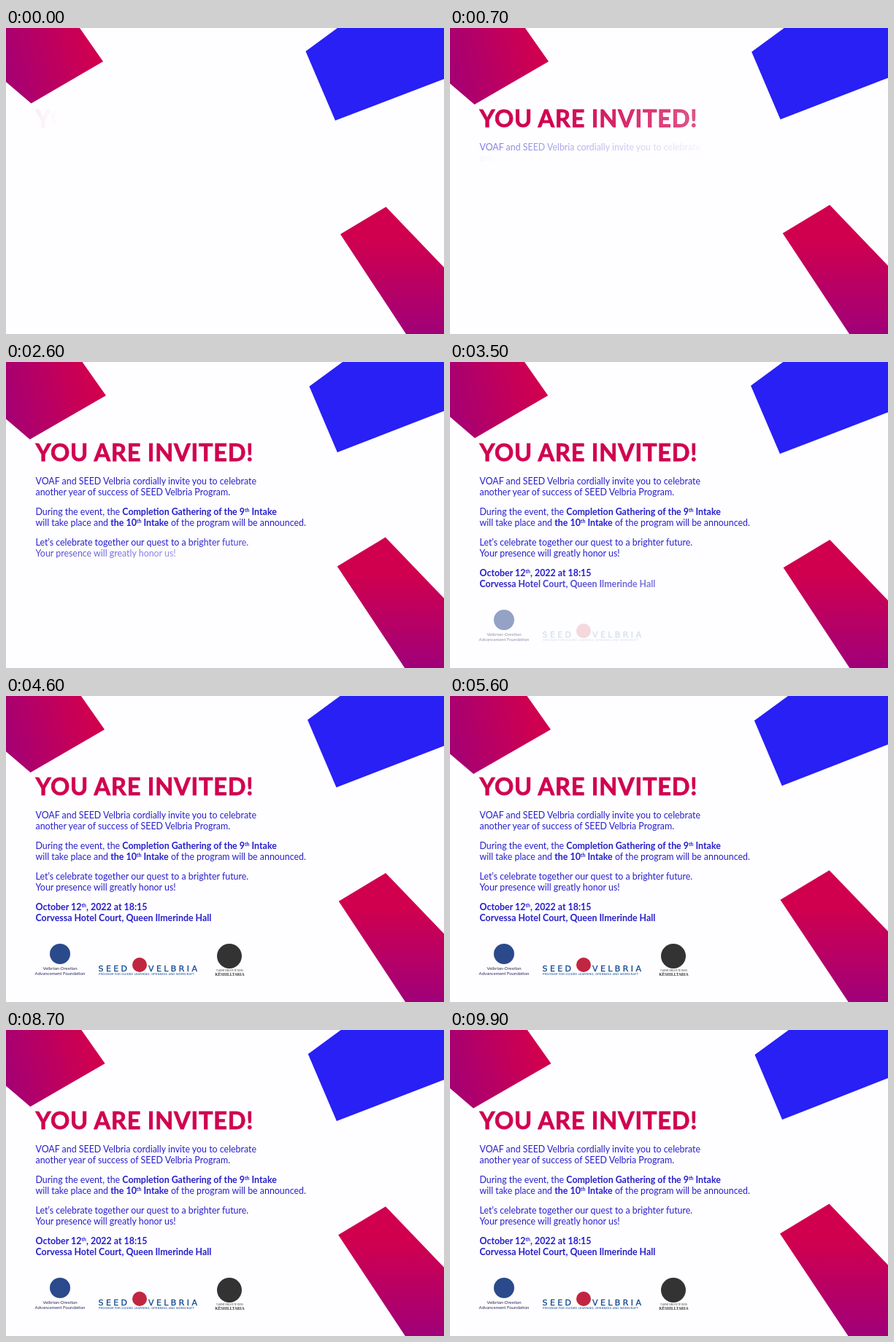
An HTML page for the animation above (10000 ms loop, 600 px wide and 420 px high).

```html
<!DOCTYPE html>
<html lang="en">
<head>
<meta charset="utf-8">
<title>Invitation</title>
<style>
  html, body { margin: 0; width: 100%; height: 100%; overflow: hidden; background: #fefdff; }
  svg { display: block; width: 600px; height: 420px; font-family: Lato, sans-serif; }
  .body { font-size: 12.4px; }
  .bold { font-weight: 700; }
  .sup { font-size: 7px; }
  .title { font-size: 32.5px; font-weight: 700; letter-spacing: .8px; stroke-width: .8px; }
  .small { font-size: 6.1px; text-anchor: middle; fill: #2b2a5c; }
  .wide { font: 11px "DejaVu Sans", sans-serif; letter-spacing: 3.4px; stroke: #124a8f; stroke-width: .3px; }
  .tag { font: 3.9px "DejaVu Sans", sans-serif; letter-spacing: .1px; }
  .serif { font-family: "Liberation Serif", serif; text-anchor: middle; }
</style>
</head>
<body>
<svg viewBox="0 0 600 420">
  <defs id="defs">
    <linearGradient id="across" gradientUnits="userSpaceOnUse" x1="-5" y1="60" x2="118" y2="30">
      <stop stop-color="#a30075"/><stop offset="1" stop-color="#d0004f"/>
    </linearGradient>
    <linearGradient id="down" gradientUnits="userSpaceOnUse" x1="0" y1="290" x2="0" y2="420">
      <stop stop-color="#d0004f"/><stop offset="1" stop-color="#a00079"/>
    </linearGradient>
  </defs>
  <rect width="600" height="420" fill="#fefdff"/>
  <g id="shapes"></g>
  <g id="lines"></g>
  <g class="logo">
    <circle cx="74" cy="354" r="14" fill="#2a4a8c"/>
    <text class="small" x="74" y="376">Velbrian-Orestian</text>
    <text class="small" x="74" y="383">Advancement Foundation</text>
  </g>
  <g class="logo" fill="#124a8f">
    <circle cx="183" cy="369" r="10" fill="#c0263f"/>
    <text class="wide" x="126.5" y="378">SEED</text>
    <text class="wide" x="195" y="378">VELBRIA</text>
    <text class="tag" x="127" y="383.3">PROGRAM FOR GUIDED LEARNING, OPENNESS AND WORKCRAFT</text>
  </g>
  <g class="logo" fill="#333">
    <circle cx="306" cy="357" r="17"/>
    <text class="serif" x="306.5" y="378.3" font-size="3.1">TAKIMI I MIQVE TË DIJES</text>
    <text class="serif bold" x="306.5" y="384" font-size="5.3">KËSHILLTARIA</text>
  </g>
</svg>
<script>
const LOOP = 10000, SWAY = 3915, SPEED = 0.9, FADE = 560, LEFT = 40.5;
const RED = '#d0024f', BLUE = '#271fcb';
const $ = id => document.getElementById(id);
const clamp = v => Math.max(0, Math.min(1, v));

function add(parent, tag, attrs, html = '') {
  const el = document.createElementNS('http://www.w3.org/2000/svg', tag);
  for (const k in attrs) el.setAttribute(k, attrs[k]);
  el.innerHTML = html;
  return parent.appendChild(el);
}

// Each shape sways between two outlines.
const shapes = [
  ['url(#across)', [0, 0, 0, 74, 34.5, 103.5, 133, 46, 101, 0],
                   [0, 0, 0, 80.3, 31.8, 107.7, 138.8, 46, 106.3, 0]],
  ['#2820f4', [410.5, 32, 454, 0, 600, 0, 600, 70, 451, 127],
              [417.9, 34.1, 464.5, 0, 600, 0, 600, 65.8, 455.3, 122.7]],
  ['url(#down)', [520.5, 245.5, 458, 283, 548, 420, 600, 420, 600, 328.5],
                 [519.4, 238.1, 451.6, 279.3, 545.3, 420, 600, 420, 600, 322.1]]
].map(([fill, from, to]) => ({ from, to, el: add($('shapes'), 'polygon', { fill }) }));

const bold = s => `<tspan class="bold">${s}</tspan>`;
const th = '<tspan class="sup" dy="-4">th</tspan><tspan dy="4">\u200b</tspan>';

// Start time, baseline, class, colour, text
const lines = [
  [-35, 136.4, 'title', RED, 'YOU ARE INVITED!'],
  [334, 168, 'body', BLUE, 'VOAF and SEED Velbria cordially invite you to celebrate'],
  [672, 183, 'body', BLUE, 'another year of success of SEED Velbria Program.'],
  [972, 210, 'body', BLUE, 'During the event, the ' + bold(`Completion Gathering of the 9${th} Intake`)],
  [1350, 225, 'body', BLUE, 'will take place and ' + bold(`the 10${th} Intake`) + ' of the program will be announced.'],
  [1763, 252, 'body', BLUE, 'Let’s celebrate together our quest to a brighter future.'],
  [2084, 267, 'body', BLUE, 'Your presence will greatly honor us!'],
  [2700, 294, 'body bold', BLUE, `October 12${th}, 2022 at 18:15`],
  [2866, 308.5, 'body bold', BLUE, 'Corvessa Hotel Court, Queen Ilmerinde Hall']
].map(([start, y, cls, color, html], i) => {
  const wipe = add($('defs'), 'linearGradient', { id: 'wipe' + i, gradientUnits: 'userSpaceOnUse', y1: 0, y2: 0 },
    `<stop stop-color="${color}"/><stop offset="1" stop-color="${color}" stop-opacity="0"/>`);
  const paint = `url(#wipe${i})`;
  const text = add($('lines'), 'text', { x: LEFT, y, class: cls, fill: paint }, html);
  if (cls === 'title') text.setAttribute('stroke', paint);
  return { start, wipe };
});

const logos = [...document.querySelectorAll('.logo')];

function draw(t) {
  const sway = 1 - Math.abs(1 - 2 * (t / SWAY % 1));
  for (const { from, to, el } of shapes)
    el.setAttribute('points', from.map((v, i) => v + (to[i] - v) * sway).join(' '));
  for (const { start, wipe } of lines) {
    const head = LEFT + (t - start) * SPEED;
    wipe.setAttribute('x1', head - FADE);
    wipe.setAttribute('x2', head);
  }
  logos.forEach((el, i) => el.setAttribute('opacity', clamp((t - 3200 - i * 200) / 600)));
}

const begin = performance.now();
function tick() {
  draw((performance.now() - begin) % LOOP);
  requestAnimationFrame(tick);
}
tick();
</script>
</body>
</html>
```
